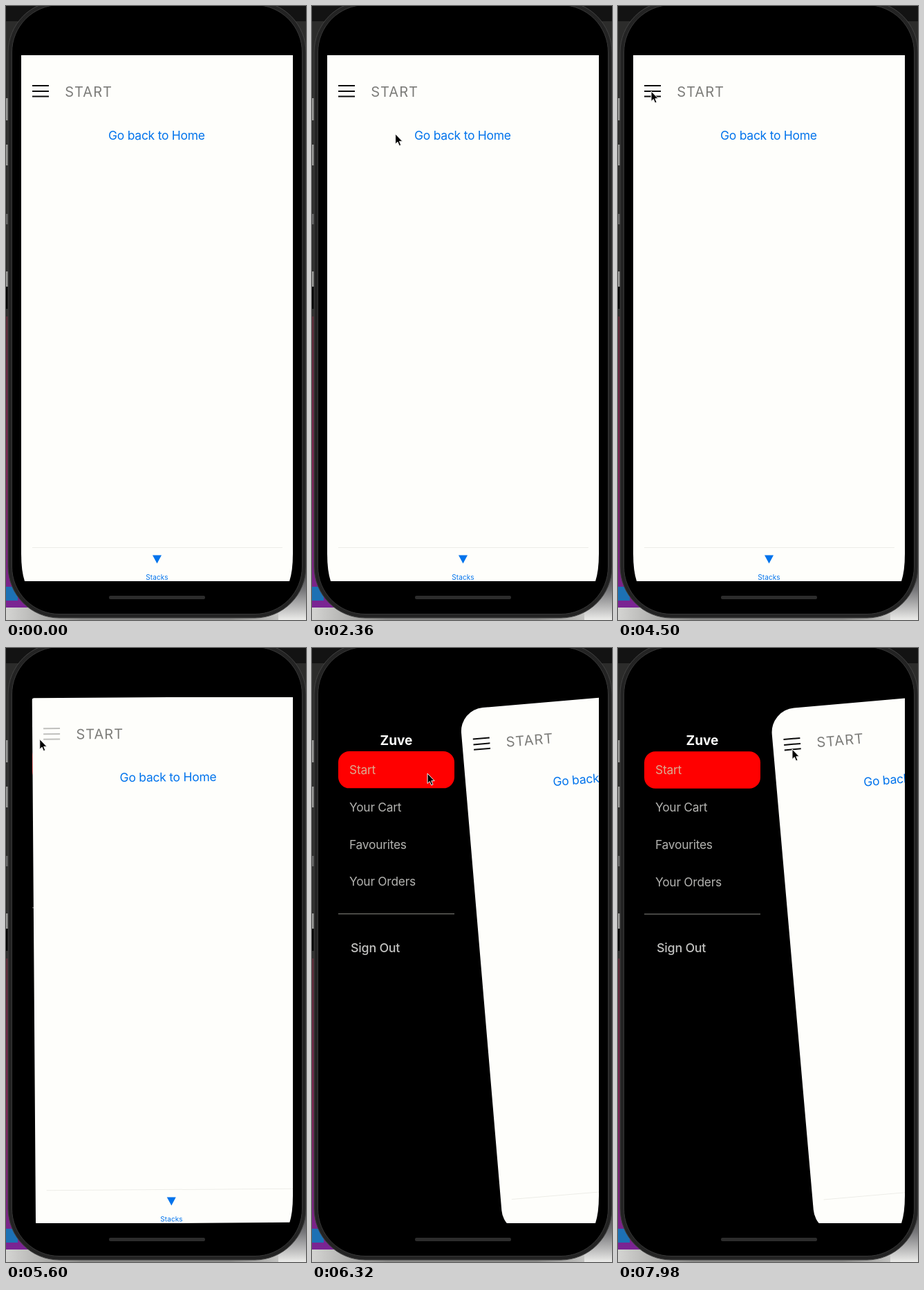
Animation, 434 px wide and 886 px high, one loop 8 s. Source, as an HTML page:

```html
<!DOCTYPE html>
<html lang="en">
<head>
<meta charset="utf-8">
<title>Drawer menu</title>
<style>
  html, body { margin: 0; width: 100%; height: 100%; overflow: hidden; background: #000; }
  svg { display: block; width: 100vw; height: 100vh; }
  text { font-family: Inter, Roboto, sans-serif; }
  .item { font-size: 17.3px; letter-spacing: -.2px; fill: #b3b3b0; }
  .link { font-size: 17.5px; letter-spacing: -.26px; }
  .blue { fill: #0073ec; }
</style>
</head>
<body>
<svg viewBox="0 0 434 886" preserveAspectRatio="none">
  <defs>
    <clipPath id="safe"><path d="M22 71H415V790Q415 815 410 830H27Q22 815 22 790Z"/></clipPath>
    <linearGradient id="wall" x2="0" y2="1">
      <stop offset="0" stop-color="#5a2a35"/>
      <stop offset=".5" stop-color="#7c2650"/>
      <stop offset="1" stop-color="#7a2494"/>
    </linearGradient>
    <linearGradient id="floor">
      <stop offset="0" stop-color="#d4d4d2"/>
      <stop offset=".25" stop-color="#8a8a88"/>
      <stop offset=".75" stop-color="#8a8a88"/>
      <stop offset="1" stop-color="#e6e6e4"/>
    </linearGradient>
    <linearGradient id="corner" x2="0" y2="1">
      <stop offset="0" stop-color="#2c2c2c"/>
      <stop offset=".5" stop-color="#77777a"/>
      <stop offset="1" stop-color="#ececea"/>
    </linearGradient>
  </defs>

  <!-- desktop behind the phone -->
  <rect width="434" height="886" fill="#2c2c2b"/>
  <rect width="434" height="22" fill="#131313"/>
  <g fill="#969694">
    <rect y="133" width="3" height="32"/>
    <rect y="200" width="3" height="30"/>
    <rect y="300" width="3" height="15" fill="#666"/>
    <rect y="383" width="3" height="22"/>
  </g>
  <rect y="405" width="4" height="32" fill="#000"/>
  <rect y="448" width="40" height="420" fill="url(#wall)"/>
  <rect y="838" width="17" height="20" fill="#1d71b4"/>
  <rect y="868" width="434" height="18" fill="url(#floor)"/>
  <rect x="394" y="800" width="40" height="86" fill="url(#corner)"/>

  <!-- phone body -->
  <rect x="3" y="-7" width="431" height="890" rx="74" fill="#232323" stroke="#424242"/>
  <rect x="8.5" y="-1.5" width="420" height="879" rx="68.5" fill="#000" stroke="#383838"/>
  <rect x="149" y="851" width="139" height="5" rx="2" fill="#2c2c2c"/>

  <g clip-path="url(#safe)">
    <g id="drawer">
      <text x="122" y="140" font-size="19" font-weight="700" text-anchor="middle" fill="#fdfdfb">Zuve</text>
      <rect x="38" y="149.3" width="168" height="53.4" rx="16" fill="#f00"/>
      <text class="item" x="54" y="182.5" style="fill:#dcaa90">Start</text>
      <text class="item" x="54" y="236.2">Your Cart</text>
      <text class="item" x="54" y="289.9">Favourites</text>
      <text class="item" x="54" y="343.6">Your Orders</text>
      <path d="M38 384H206" stroke="#8c8c86"/>
      <text x="56" y="439" font-size="17.8" font-weight="500" letter-spacing="-.2" fill="#c2c2c0">Sign Out</text>
    </g>
    <g id="pane">
      <rect id="sheet" x="22" y="71" width="393" height="759" fill="#fefefb"/>
      <path id="burger" d="M38 115H62M38 123H62M38 130.5H62" stroke="#0a0a0a" stroke-width="2"/>
      <text x="85.3" y="130.5" font-size="20" letter-spacing="1.05" fill="#7c7c79">START</text>
      <text class="link blue" x="148" y="192.5">Go back to Home</text>
      <path d="M38 781.5H400" stroke="#ededE8"/>
      <path class="blue" d="M212 792.5H225L218.5 804.5Z"/>
      <text class="blue" x="218.5" y="827.5" font-size="10" text-anchor="middle" letter-spacing=".1">Stacks</text>
    </g>
  </g>

  <path id="cursor" d="M0 0V14.5L3.3 11.5L5.6 17L8 16L5.8 10.7H10.2Z" fill="#000" stroke="#f4f4f2" stroke-linejoin="round"/>
</svg>
<script>
const LOOP = 8000, OPEN_AT = 5531, SPRING = 6.65 / 1000;
const SHIFT = 230, TILT = 5, RADIUS = 35;
const el = id => document.getElementById(id);
const [drawer, pane, sheet, burger, cursor] =
  ["drawer", "pane", "sheet", "burger", "cursor"].map(el);

// time, x, y of the pointer tip
const path = [
  [800, 332, 890], [1100, 268, 842], [1420, 194, 773], [1660, 200, 757],
  [2400, 120, 180], [2750, 80, 128], [3100, 66, 116], [4080, 62, 117],
  [4500, 48, 123], [5200, 48, 130], [5760, 49, 132], [6320, 167, 181],
  [7000, 200, 172], [7980, 252, 146]
];
// time, opacity of the pressed menu button
const press = [[5380, 1], [5500, .25], [5600, .25], [5960, 1]];

function sample(keys, t) {
  const last = keys[keys.length - 1];
  if (t <= keys[0][0]) return keys[0].slice(1);
  if (t >= last[0]) return last.slice(1);
  const i = keys.findIndex(k => k[0] > t);
  const a = keys[i - 1], b = keys[i];
  const u = (t - a[0]) / (b[0] - a[0]), s = u * u * (3 - 2 * u);
  return a.slice(1).map((v, n) => v + (b[n + 1] - v) * s);
}

// critically damped spring from 0 to 1
function spring(t) {
  const w = Math.max(0, t) * SPRING;
  return 1 - (1 + w) * Math.exp(-w);
}

function draw(t) {
  const p = spring(t - OPEN_AT);
  pane.setAttribute("transform", `translate(${SHIFT * p} 0) rotate(${-TILT * p} 218.5 450.5)`);
  sheet.setAttribute("rx", RADIUS * p);
  drawer.setAttribute("transform", `translate(0 ${-10 * (1 - p)})`);
  burger.setAttribute("opacity", sample(press, t)[0]);
  const [x, y] = sample(path, t);
  cursor.setAttribute("transform", `translate(${x} ${y})`);
  cursor.setAttribute("visibility", t < path[0][0] ? "hidden" : "visible");
}

const start = performance.now();
function tick() {
  draw((performance.now() - start) % LOOP);
  requestAnimationFrame(tick);
}
tick();
</script>
</body>
</html>
```
